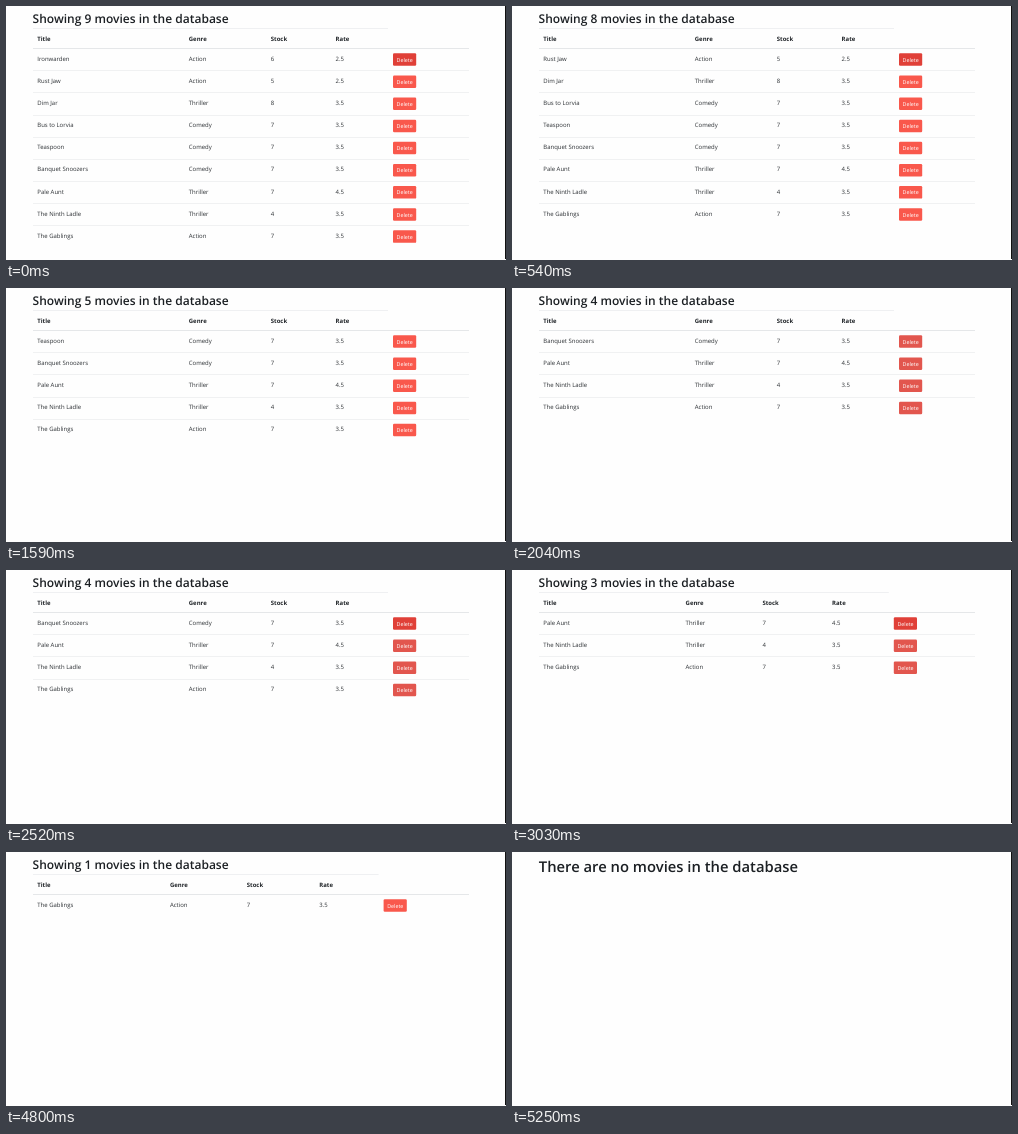
An HTML page for the animation above (8160 ms loop, 500 by 254 pixels).

```html
<!DOCTYPE html>
<html lang="en">
<head>
<meta charset="utf-8">
<title>Movie table</title>
<style>
  html, body { margin: 0; width: 100%; height: 100%; overflow: hidden; background: #fefefe; }
  svg { display: block; width: 500px; height: 254px; }
  text { font: 400 5.97px "Open Sans", "Noto Sans", sans-serif; fill: #2b2f33; text-rendering: geometricPrecision; }
  .heading { font-weight: 600; font-size: 12.02px; fill: #1c2024; }
  .empty { font-size: 14.8px; }
  .head { font-weight: 700; fill: #212529; }
  .label { font-size: 5.35px; fill: #fff; }
</style>
</head>
<body>
<svg id="stage" viewBox="0 0 500 254" xmlns="http://www.w3.org/2000/svg">
  <rect width="500" height="254" fill="#fefefe"/>
  <g id="view"></g>
  <rect x="499" width="1" height="253" fill="#111"/>
</svg>
<script>
const LOOP = 8160;
const FADE = 150;
const PITCH = 22.13;
const RED = [249, 88, 76];
const SOFT = [226, 86, 78];
const DARK = [224, 64, 56];

const movies = [
  ["Ironwarden", "Action", 6, 2.5],
  ["Rust Jaw", "Action", 5, 2.5],
  ["Dim Jar", "Thriller", 8, 3.5],
  ["Bus to Lorvia", "Comedy", 7, 3.5],
  ["Teaspoon", "Comedy", 7, 3.5],
  ["Banquet Snoozers", "Comedy", 7, 3.5],
  ["Pale Aunt", "Thriller", 7, 4.5],
  ["The Ninth Ladle", "Thriller", 4, 3.5],
  ["The Gablings", "Action", 7, 3.5]
];

// Moments at which the top row is deleted
const deletions = [60, 570, 1110, 1590, 2040, 2550, 3060, 3540, 5220];
const lastHover = 5190;

const view = document.getElementById("view");
let shown = -1;
let topButton = null;

function add(tag, attrs, content = "") {
  const node = document.createElementNS("http://www.w3.org/2000/svg", tag);
  for (const key in attrs) node.setAttribute(key, attrs[key]);
  node.textContent = content;
  view.appendChild(node);
  return node;
}

function text(x, y, content, cls = "") {
  add("text", { x, y, class: cls }, content);
}

function line(y, right, fill) {
  add("rect", { x: 27, y, width: right - 27, height: 1, fill });
}

// Buttons are softer while two to four rows are left
const baseRed = count => count > 1 && count < 5 ? SOFT : RED;
const mix = (from, k) => `rgb(${from.map((c, i) => Math.round(c + (DARK[i] - c) * k))})`;

// The columns shrink with the widest title left
function columns(count) {
  if (count > 3) return [31.3, 182.8, 264.8, 329.6, 387];
  if (count > 1) return [31.3, 173.6, 250.4, 320, 381.8];
  return [31.3, 164, 240.8, 313.3, 377.6];
}

function build(count) {
  view.replaceChildren();
  topButton = null;
  if (!count) {
    text(26.8, 20, "There are no movies in the database", "heading empty");
    return;
  }
  const cols = columns(count);
  text(26.6, 17.2, `Showing ${count} movies in the database`, "heading");
  line(22, cols[4] - 5, "#eff0f2");
  line(42, 463, "#e5e7e9");
  ["Title", "Genre", "Stock", "Rate"].forEach((name, i) => text(cols[i], 35.1, name, "head"));

  movies.slice(-count).forEach((movie, row) => {
    const y = row * PITCH;
    if (row) line(Math.round(42.2 + y), 463, "#f0f1f2");
    movie.forEach((value, i) => text(cols[i], 54.8 + y, value));
    const button = add("rect", {
      x: cols[4], y: 47.3 + y, width: 23.2, height: 12.5, rx: 1.2, fill: mix(baseRed(count), 0)
    });
    topButton = topButton || button;
    text(cols[4] + 3.6, 55.6 + y, "Delete", "label");
  });
}

function hover(t, gone) {
  if (gone === 0) return 1;
  if (gone === 8) return t >= lastHover ? 1 : 0;
  return Math.min(1, (t - deletions[gone - 1]) / FADE);
}

function draw(now) {
  const t = now % LOOP;
  const gone = deletions.filter(d => t >= d).length;
  const count = movies.length - gone;
  if (count !== shown) build(shown = count);
  if (topButton) topButton.setAttribute("fill", mix(baseRed(count), hover(t, gone)));
}

const start = performance.now();
function tick() {
  draw(performance.now() - start);
  requestAnimationFrame(tick);
}
tick();
</script>
</body>
</html>
```
